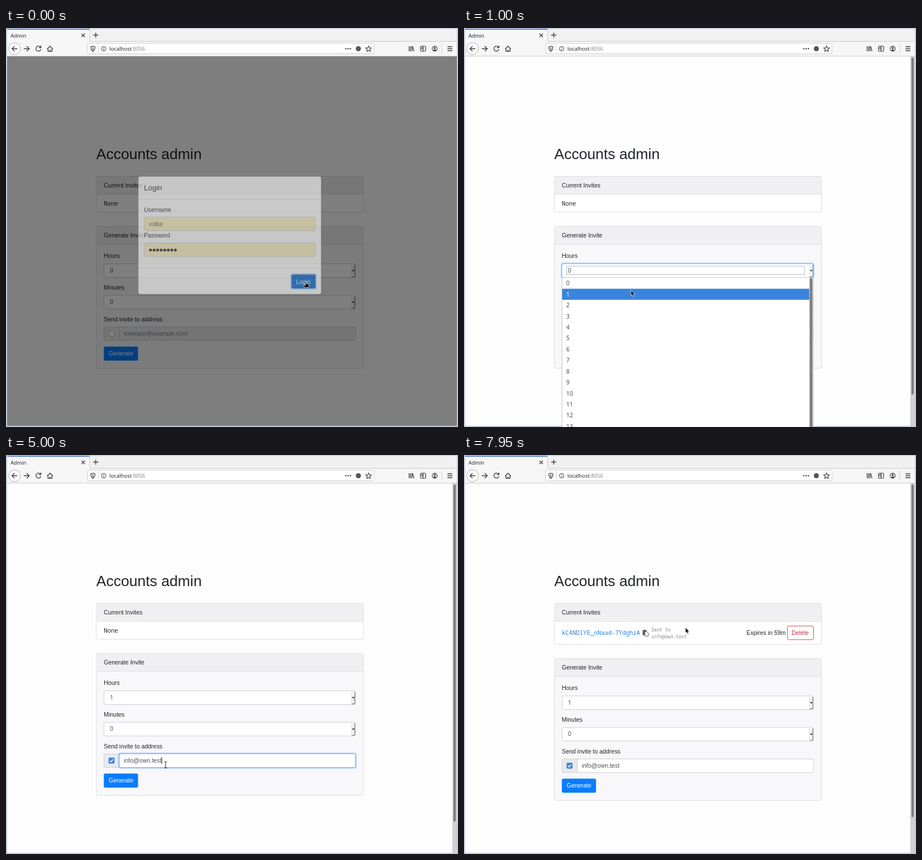
Animation of 796x703 px, one loop 8000 ms. Source, as an HTML page:

```html
<!DOCTYPE html>
<html lang="en">
<head>
<meta charset="utf-8">
<title>Accounts admin</title>
<style>
  html, body { margin: 0; width: 100%; height: 100%; overflow: hidden; background: #fefdfe; }
  svg { display: block; width: 796px; height: 703px; }
  text { font: 10.45px "Liberation Sans", Arial, sans-serif; fill: #212529; white-space: pre; }
  .h1 { font-size: 26.1px; }
  .h5 { font-size: 13px; }
  .ui { font: 9.3px "Noto Sans", sans-serif; }
  .num { font: 10.4px "Noto Sans", sans-serif; fill: #495057; }
  .mono { font: 10.45px "Noto Sans Mono", monospace; }
  .note { font: italic 8px "DejaVu Sans Mono", monospace; fill: #85858a; }
  .white { fill: #fff; }
  .icon { fill: none; stroke: #3c3c40; stroke-width: 1.3; }
  .ring { fill: none; stroke: #007bff; stroke-opacity: .27; stroke-width: 2.2; }
</style>
</head>
<body>
<svg id="stage" viewBox="0 0 796 703"></svg>
<script>
const stage = document.getElementById('stage');
const EMAIL = 'info@own.test';
const LOOP = 8000, STEP = 50;
const ROW_TOP = 440, ROW_HEIGHT = 19.42;
const T = {
  modalGone: 100, open: 850, choose: 1150, blurSelect: 2000, check: 2650,
  focusField: 3700, type: 3900, typeEnd: 4900, generate: 5800, invite: 6500, blurButton: 7750
};
// Pointer stops: time, x, y
const POINTER = [
  [0, 528, 446], [200, 507, 453], [350, 507, 453], [800, 294, 427], [880, 294, 428],
  [1000, 294, 462], [1300, 294, 464], [1750, 290, 474], [2400, 186, 543], [2900, 186, 543],
  [3600, 281, 546], [5200, 281, 546], [5700, 197, 578], [6800, 197, 578], [7600, 390, 304], [8000, 390, 304]
];

const rect = (x, y, w, h, fill, stroke = 'none', r = 0, extra = '') =>
  `<rect x="${x}" y="${y}" width="${w}" height="${h}" rx="${r}" fill="${fill}" stroke="${stroke}" ${extra}/>`;
const text = (x, y, s, cls = '', extra = '') => `<text x="${x}" y="${y}" class="${cls}" ${extra}>${s}</text>`;
const icon = (d, extra = '') => `<path class="icon" d="${d}" ${extra}/>`;
const ring = (x, y, w, h) => rect(x - 1.1, y - 1.1, w + 2.2, h + 2.2, 'none', 'none', 3.4, 'class="ring"');
const group = (id, body) => `<g id="${id}">${body}</g>`;

const select = (y, id) =>
  rect(172.5, y, 442.5, 24, '#fff', '#ced0d5', 2.5) +
  rect(608, y + 1.5, 6.5, 22, '#f3f3f4') +
  `<path d="M608.5 ${y + 2}V${y + 22}" stroke="#dededf"/><path d="M609 ${y + 23}H614.3V${y + 1.5}" fill="none" stroke="#626266"/>
   <path d="M609.3 ${y + 11}h4.6l-2.3 2.6z" fill="#111"/>` +
  text(183, y + 15.4, '0', 'num', `id="${id}"`);

const chrome = `
  ${rect(0, 0, 796, 50, '#f1f1f2')}
  ${rect(2, 2, 145, 21, '#f7f7f8')}
  ${rect(0, 23, 796, 27, '#f6f6f7')}
  <path d="M147.5 2V23.5H796M0 49.5H796" fill="none" stroke="#cbcbcd"/>
  ${rect(2, 1, 145, 2, '#4676c4')}
  ${text(8, 16.5, 'Admin', 'ui', 'style="font-size:9px"')}
  ${icon('M133 10l6 6m0-6l-6 6', 'stroke-width="1.1"')}
  ${icon('M153.5 12.5h9m-4.5-4.5v9')}
  <circle cx="15" cy="36.5" r="10.5" fill="#fbfbfc" stroke="#b5b5b8"/>
  ${icon('M20 36.5H10.5m4.5-4.5l-4.5 4.5 4.5 4.5M31.5 36.5H41m-4.5-4.5l4.5 4.5-4.5 4.5')}
  ${icon('M60.5 33.5a4.4 4.4 0 1 0 .9 4M61.5 31v3.5h-3.5')}
  ${icon('M72.5 37l5-5 5 5M74 36.5v4.5h7v-4.5M77.5 41v-3')}
  ${rect(143.5, 27, 504.5, 18.5, '#fff', '#cdcdd0', 2)}
  ${icon('M153 32l3.6 1.2q.2 5.5-3.6 8-3.8-2.5-3.6-8zM153 34v5')}
  <path d="M162.5 30v13M767.5 28v17" stroke="#d5d5d7"/>
  <circle cx="172" cy="36.5" r="4" class="icon" style="stroke-width:1"/>
  ${icon('M172 36v3M172 33.8v1.2', 'style="stroke-width:1"')}
  ${text(182, 40, 'localhost<tspan fill="#88888b">:8056</tspan>', 'ui')}
  ${[598.5, 602.5, 606.5].map(x => `<circle cx="${x}" cy="36.5" r="1.2" fill="#3c3c40"/>`).join('')}
  <circle cx="620.5" cy="36.5" r="4.5" fill="#55555a"/>
  ${icon('M638.5 31.5l1.5 3.4 3.6.3-2.8 2.4.9 3.6-3.2-2-3.2 2 .9-3.6-2.8-2.4 3.6-.3z', 'style="stroke-width:1.1"')}
  ${icon('M710 32v9M712.5 32v9M715 32v9M716 32.5l2.5 8.5')}
  ${rect(730, 32, 9, 9, 'none', '#3c3c40', 1.5, 'stroke-width="1.2"')}
  ${icon('M734.5 32v9M731.5 34.5h2M731.5 36.5h2')}
  <circle cx="755" cy="36.5" r="4.4" class="icon" style="stroke-width:1.1"/>
  <circle cx="755" cy="35.3" r="1.7" fill="#3c3c40"/>
  <path d="M752 39q3-2.5 6 0-3 2.5-6 0" fill="#3c3c40"/>
  ${icon('M777.5 33h8.5M777.5 36.5h8.5M777.5 40h8.5')}`;

const invitesCard = `
  <rect id="listCard" x="159" y="261.5" width="470.5" fill="#fff" stroke="#dddce0" rx="2.6"/>
  ${rect(159.5, 262, 469.5, 30.5, '#f0eff1')}
  <path d="M159 293H629" stroke="#dddce0"/>
  ${text(172.3, 281, 'Current Invites')}
  ${text(172.3, 312.8, 'None', 'mono', 'id="none"')}
  ${group('invite', `
    ${text(172.3, 317, 'kC4NDlYE_nNaad-7YdghzA', 'mono', 'style="fill:#2380e0"')}
    ${rect(314.5, 308.5, 7, 9, '#5f6064', 'none', 1)}
    ${rect(316.5, 307.8, 3, 1.8, '#5f6064')}
    <path d="M318.5 311.5h3.5l2.5 2.5v5h-6z" fill="#fff" stroke="#5f6064"/>
    ${text(330, 310.8, 'Sent to', 'note')}
    ${text(330, 322.5, EMAIL, 'note')}
    ${text(497.5, 316.8, 'Expires in 59m')}
    ${rect(569.5, 301.3, 46, 24, '#fff', '#c9505c', 2.5)}
    ${text(577, 317, 'Delete', '', 'style="fill:#c43347"')}`)}`;

const form = group('form', `
  ${rect(159, 349.5, 470.5, 250, '#f8f7f9', '#dddce0', 2.6)}
  ${rect(159.5, 350, 469.5, 30.5, '#f0eff1')}
  <path d="M159 381H629" stroke="#dddce0"/>
  ${text(172.3, 368.5, 'Generate Invite')}
  ${text(172.3, 405.3, 'Hours')}
  ${select(415.5, 'hours')}
  ${group('selectFocus',
    ring(172.5, 415.5, 442.5, 24) + rect(172.5, 415.5, 442.5, 24, 'none', '#80bdff', 2.5) +
    rect(180.5, 419.5, 419, 15, 'none', '#77777a', 0, 'stroke-dasharray="1 1"'))}
  ${text(172.3, 461.2, 'Minutes')}
  ${select(471, 'minutes')}
  ${text(172.3, 516.8, 'Send invite to address')}
  ${rect(172.5, 526.5, 443, 24, '#e9eaec', '#ced0d5', 2.5)}
  <rect id="field" x="199.5" y="526.5" width="416" height="24" rx="1.5"/>
  ${group('fieldRing', ring(199.5, 526.5, 416, 24))}
  ${rect(181, 533.5, 9.8, 9.8, '#fff', '#b3b3b8', 1.5)}
  ${group('tick', rect(180.7, 533.2, 10.4, 10.4, '#3f86e0', 'none', 1.8) +
    '<path d="M183.2 538.5l2 2.2 3.6-4.6" fill="none" stroke="#fff" stroke-width="1.5"/>')}
  ${text(207.5, 542, '', '', 'id="address"')}
  <path id="caret" d="M0 532.5v12" stroke="#222"/>
  ${group('buttonRing', ring(172.3, 561.3, 60.2, 24.6))}
  <rect id="button" x="172.3" y="561.3" width="60.2" height="24.6" rx="2.5"/>
  ${text(180.8, 577, 'Generate', 'white')}`);

const scrollbar = group('scrollbar',
  rect(786, 50, 8, 651, '#d0d0d2') + '<rect id="thumb" x="788" y="52" width="4" rx="2" fill="#7d7d80"/>');

const rowBase = i => ROW_TOP + ROW_HEIGHT * i + 13.3;
const dropdown = group('dropdown',
  rect(172.5, ROW_TOP - .5, 442.5, 280, '#fff', '#c4c4c8') +
  Array.from({ length: 14 }, (_, i) => text(180, rowBase(i), i, 'num')).join('') +
  `<rect id="hover" x="173" width="435" height="${ROW_HEIGHT}" fill="#3a84de"/>` +
  text(180, 0, '', 'num white', 'id="hoverText" style="fill:#fff"') +
  rect(608, ROW_TOP, 7, 270, '#d0d0d2') + rect(609, 441, 4.5, 280, '#7d7d80', 'none', 2));

const modal = group('modal', `
  ${rect(233, 261.5, 322, 207.5, '#fff', 'rgba(0,0,0,.2)', 3)}
  ${text(243, 285.8, 'Login', 'h5')}
  <path d="M234 301.5H554M234 423.5H554" stroke="#dee2e6"/>
  ${text(243, 324, 'Username')}
  ${rect(243.5, 333, 301.5, 24, '#fbf1bd', '#ced4da', 2.5)}
  ${text(251.5, 349, 'volka', '', 'style="fill:#495057"')}
  ${text(243, 369.3, 'Password')}
  ${rect(243.5, 378.8, 301.5, 24, '#fbf1bd', '#ced4da', 2.5)}
  ${Array.from({ length: 8 }, (_, i) => `<circle cx="${254.5 + 6.25 * i}" cy="391.3" r="2.5" fill="#222"/>`).join('')}
  ${ring(502.7, 434.3, 42.5, 24.6)}
  ${rect(502.7, 434.3, 42.5, 24.6, '#0062cc', 'none', 2.5)}
  ${text(511, 450.5, 'Login', 'white')}`);

const pointer = group('pointer', `
  <path id="arrow" d="M0 0V9.8L2.2 7.8 3.8 11.5 5.6 10.7 4 7.1H7z" fill="#111" stroke="#fff" stroke-width=".7"/>
  <path id="beam" d="M-2.5-5.5Q0-5.5 0-4.5 0-5.5 2.5-5.5M0-4.5V4.5M-2.5 5.5Q0 5.5 0 4.5 0 5.5 2.5 5.5" fill="none" stroke="#333" stroke-width="1.1"/>
  <path id="hand" d="M-1 .8Q0-.6 1 .8V4.4L4.8 5.2Q5.8 5.6 5.6 7L4.8 11.3H-1.8L-4.6 7.4Q-4.5 5.7-3 6.5L-1 8z" fill="#111" stroke="#fff" stroke-width=".7"/>`);

stage.innerHTML = `
  ${rect(0, 0, 796, 703, '#fefdfe')}
  ${text(159, 231, 'Accounts admin', 'h1')}
  ${invitesCard}${form}${scrollbar}
  ${rect(0, 50, 796, 653, '#000', 'none', 0, 'id="backdrop"')}
  ${modal}${chrome}
  <path d="M1 0V703M795 0V703M0 702H796M0 .5H796" fill="none" stroke="#c6cbda" stroke-width="2"/>
  ${dropdown}${pointer}`;

const el = {};
stage.querySelectorAll('[id]').forEach(node => el[node.id] = node);
const show = (node, on) => node.style.display = on ? '' : 'none';
const set = (node, attrs) => { for (const key in attrs) node.setAttribute(key, attrs[key]); };
const clamp = v => Math.min(1, Math.max(0, v));
const within = (v, a, b) => v >= a && v < b;

function pointerAt(t) {
  const next = Math.max(1, POINTER.findIndex(stop => stop[0] > t));
  const [t0, x0, y0] = POINTER[next - 1], [t1, x1, y1] = POINTER[next];
  const k = clamp((t - t0) / (t1 - t0)), e = k * k * (3 - 2 * k);
  return [x0 + (x1 - x0) * e, y0 + (y1 - y0) * e];
}

function render(t) {
  const [x, y] = pointerAt(t);
  const invited = t >= T.invite, checked = t >= T.check;
  const shift = invited ? 9 : 0;

  // Login dialog fades while sliding up, then the backdrop clears
  set(el.modal, { opacity: .58 * clamp(1 - t / T.modalGone), transform: `translate(0 ${-22 * clamp(t / 150)})` });
  set(el.backdrop, { opacity: .5 * clamp((175 - t) / 75) });
  show(el.scrollbar, t >= 150);

  show(el.none, !invited);
  show(el.invite, invited);
  set(el.listCard, { height: 63 + shift });
  set(el.form, { transform: `translate(0 ${shift})` });
  set(el.thumb, { height: 594 - (invited ? 8 : 0) });

  const open = within(t, T.open, T.choose);
  const row = Math.max(0, Math.floor((y - ROW_TOP) / ROW_HEIGHT));
  show(el.dropdown, open);
  show(el.selectFocus, within(t, T.open, T.blurSelect));
  set(el.hover, { y: ROW_TOP + ROW_HEIGHT * row });
  set(el.hoverText, { y: rowBase(row) });
  el.hoverText.textContent = row;
  el.hours.textContent = t >= T.choose ? '1' : '0';

  const focused = within(t, T.focusField, T.generate);
  const typed = EMAIL.slice(0, Math.ceil(EMAIL.length * clamp((t - T.type) / (T.typeEnd - T.type))));
  show(el.tick, checked);
  show(el.fieldRing, focused);
  set(el.field, { fill: checked ? '#fff' : '#e9eaec', stroke: focused ? '#80bdff' : '#ced0d5' });
  el.address.textContent = typed || 'example@example.com';
  el.address.style.fill = typed ? '#495057' : '#7c838a';
  show(el.caret, focused && t < 5500);
  set(el.caret, { transform: `translate(${208 + (typed ? el.address.getComputedTextLength() : 0)} 0)` });

  const overButton = within(x, 172, 233) && within(y, 561 + shift, 586 + shift);
  const overField = checked && within(x, 199, 616) && within(y, 526 + shift, 551 + shift);
  set(el.button, { fill: overButton ? '#0066d3' : '#0a7cfc' });
  show(el.buttonRing, within(t, T.generate, T.blurButton));

  const hand = overButton || t < T.modalGone;
  show(el.hand, hand);
  show(el.beam, overField && !hand);
  show(el.arrow, !overField && !hand);
  set(el.pointer, { transform: `translate(${x} ${y})` });
}

const start = performance.now();
function tick() {
  const t = (performance.now() - start) % LOOP;
  render(Math.floor(t / STEP) * STEP);
  requestAnimationFrame(tick);
}
tick();
</script>
</body>
</html>
```
